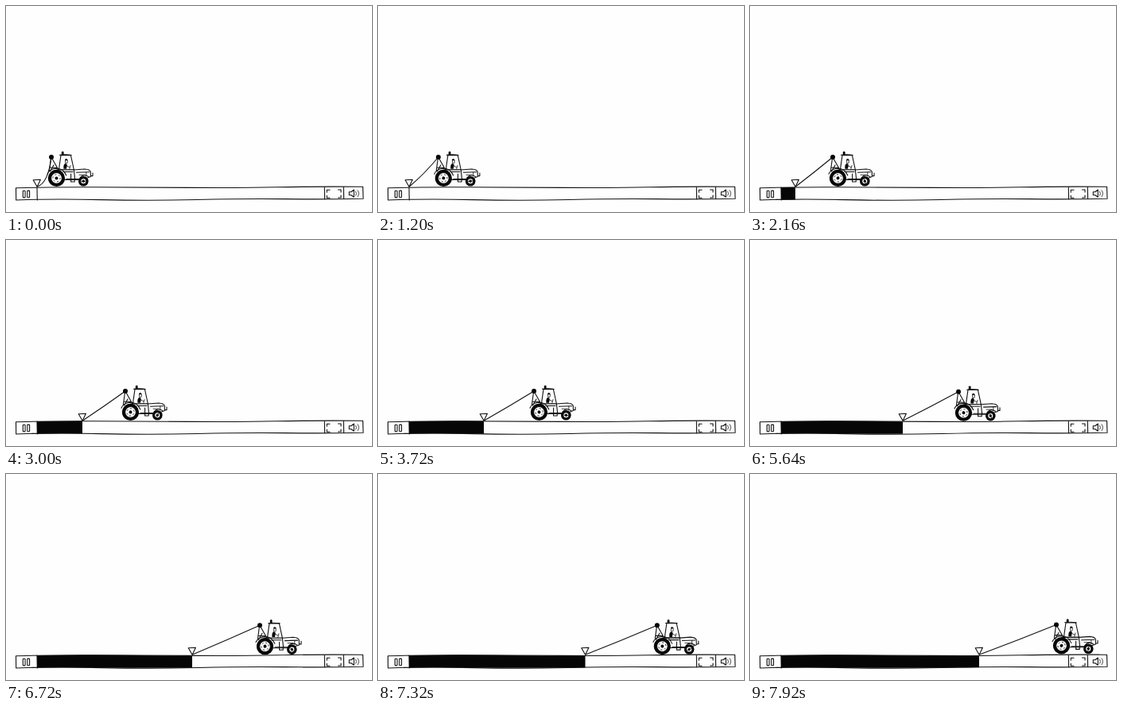
Recreate the animation shown at these times as an HTML page. Size 460 by 259 pixels, loop 8000 ms.

```html
<!DOCTYPE html>
<html lang="en">
<head>
<meta charset="utf-8">
<title>Tractor pulling a progress bar</title>
<style>
html, body { margin: 0; width: 100%; height: 100%; overflow: hidden; background: #fefefe; }
svg { display: block; width: 100vw; height: 100vh; }
.ink { fill: none; stroke: #111; stroke-width: 1.1; stroke-linecap: round; stroke-linejoin: round; }
.paper { fill: #fefefe; }
.solid { fill: #060606; stroke: none; }
.thin { stroke-width: .8; }
</style>
</head>
<body>
<svg viewBox="0 0 460 259">
  <defs>
    <clipPath id="done"><rect id="fill" x="39" y="220" width="0" height="30"/></clipPath>
  </defs>

  <g class="ink">
    <path class="solid" clip-path="url(#done)"
      d="M39 228 Q110 227 190 228.3 T400 228 V243 Q330 242.6 260 243.4 T130 243.6 T39 243.7Z"/>
    <path d="M12.5 228.7 Q60 227.6 110 227.8 T230 228.4 T340 227.8 T448.5 227.2
      L449 242.3 Q400 243.2 350 242.6 T240 243.5 T120 243.6 T12.7 244 Z"/>
    <path d="M39 228 L39.3 244 M400.3 228 L400.6 242.8 M424.3 227.5 L424.6 242.5"/>
    <rect x="21.3" y="232.3" width="2.8" height="8.6" rx=".8"/>
    <rect x="26.8" y="232.1" width="2.8" height="8.6" rx=".8"/>
    <path d="M403.3 234.3 V231.3 H407 M417.5 231 H421 V234 M421 238 V241 H417.5 M407 241.3 H403.3 V238.2"/>
    <path d="M431.3 233.8 H433.8 L437.3 231 V240.3 L433.8 237.7 H431.3Z"/>
    <path class="thin" d="M439.6 233.3 Q441.4 235.6 439.7 238.2 M442 231.8 Q445 235.6 442.1 239.6"/>
  </g>

  <path id="rope" class="ink"/>
  <path id="marker" class="ink paper" d="M-4.8 218.7 L4.4 218.3 L.1 227.3Z"/>

  <g id="tractor" class="ink">
    <!-- hoist -->
    <path d="M-.6 192 L-2.6 207 M1 192 L9 206 M-2.2 203 L7.5 203.4 M-1.5 208 L3 200"/>
    <circle class="solid" cx="0" cy="190" r="3"/>
    <!-- cab -->
    <path class="paper" d="M12 187.6 L9.4 206 H28.4 L24.4 187.6Z"/>
    <path d="M10.6 187.4 Q18 186.4 25.2 187.5"/>
    <path class="solid" d="M12.8 187 V183.6 Q14.2 181.9 15.6 183.6 V187Z"/>
    <!-- driver -->
    <path class="solid" d="M17 193.4 Q18.6 190.8 20.4 193.2 L20.8 194.4 H17.4Z"/>
    <path class="paper thin" d="M17.6 194.5 V197.3 Q19 198.4 20.2 197.2 V194.5"/>
    <path class="solid" d="M15.4 204.8 Q14.8 199 17.7 197.8 L19.8 199.4 L19 204.8Z"/>
    <path class="thin" d="M18.6 200.6 L22.6 202.6 M24 200.5 L22.8 205"/>
    <!-- body -->
    <path class="paper" d="M7 206 H28 L42 205 Q48 205.4 49.3 208.2 L49.4 214.6 L45.5 216 L34 218.4 H14Z"/>
    <path d="M28.4 206 L29.6 217.6 M15 208.5 H27 M31.5 209.3 L47.8 208.8" />
    <path class="thin" d="M35 212.3 H42 M43.8 209.3 V214"/>
    <path d="M24.6 211 V221 H29.2 V217.8 M19 217.5 H35"/>
    <path d="M36.2 215.8 Q40.5 210.4 46.8 214.6 M50 213.6 H52 V210"/>
    <!-- wheels -->
    <path d="M-5 211.2 Q-2 204.6 6.5 204.3 Q15 204.3 18.8 213"/>
    <circle class="solid" cx="6.5" cy="216.4" r="10.6"/>
    <circle class="paper" cx="6.5" cy="216.4" r="6.9"/>
    <g id="rear">
      <circle r="4.6" class="thin" stroke-dasharray="1.4 3.4"/>
      <circle r="2" class="solid"/>
    </g>
    <circle class="solid" cx="40.3" cy="220.3" r="6.3"/>
    <circle class="paper" cx="40.3" cy="220.3" r="3.6"/>
    <g id="front">
      <circle r="1.7" class="solid"/>
      <path class="thin" d="M-2.6 0 H2.6"/>
    </g>
  </g>
</svg>

<script>
const LOOP = 8000, STEP = 120;

// [time in ms, value]
const tractorX = [[0, 57], [480, 57], [1320, 79], [2160, 104], [3000, 150], [3720, 196],
  [3840, 202], [4680, 233], [4800, 238], [5520, 256], [5640, 262], [6360, 303],
  [6720, 319], [7200, 344], [7920, 385]];
const markerX = [[0, 39], [1320, 39], [2160, 57], [3000, 96], [3720, 133], [3840, 138],
  [4680, 166], [4800, 169.3], [5520, 187], [5640, 192], [6360, 217], [6720, 234],
  [7200, 255], [7920, 288]];
const bob = [[0, 0], [3840, 0], [4680, .8], [5640, .8], [6720, .3], [7200, .3], [7920, -.6]];
const slack = [[0, 1], [480, 1], [1320, .05], [7920, .05]];

const $ = id => document.getElementById(id);
const place = (el, x, y, turn = 0) =>
  el.setAttribute('transform', `translate(${x} ${y}) rotate(${turn})`);

function at(track, t) {
  const i = track.findIndex(k => k[0] >= t);
  if (i < 1) return track[i < 0 ? track.length - 1 : 0][1];
  const [t0, a] = track[i - 1], [t1, b] = track[i];
  return a + (b - a) * (t - t0) / (t1 - t0);
}

function draw(now) {
  const t = Math.floor((now % LOOP) / STEP) * STEP;
  const x = at(tractorX, t), y = at(bob, t), m = at(markerX, t), s = at(slack, t);
  const spin = r => (x - 57) / r * 180 / Math.PI;

  place($('tractor'), x, y);
  place($('rear'), 6.5, 216.4, spin(10.6));
  place($('front'), 40.3, 220.3, spin(6.3));
  place($('marker'), m, 0);
  $('fill').setAttribute('width', Math.max(0, m - 39));

  const hookY = 190 + y;
  const cx = (m + x) / 2 + 5 * s, cy = (227 + hookY) / 2 + 14 * s;
  $('rope').setAttribute('d', `M${m + .5} 227 Q${cx} ${cy} ${x} ${hookY}`);
  requestAnimationFrame(draw);
}

requestAnimationFrame(draw);
</script>
</body>
</html>
```
